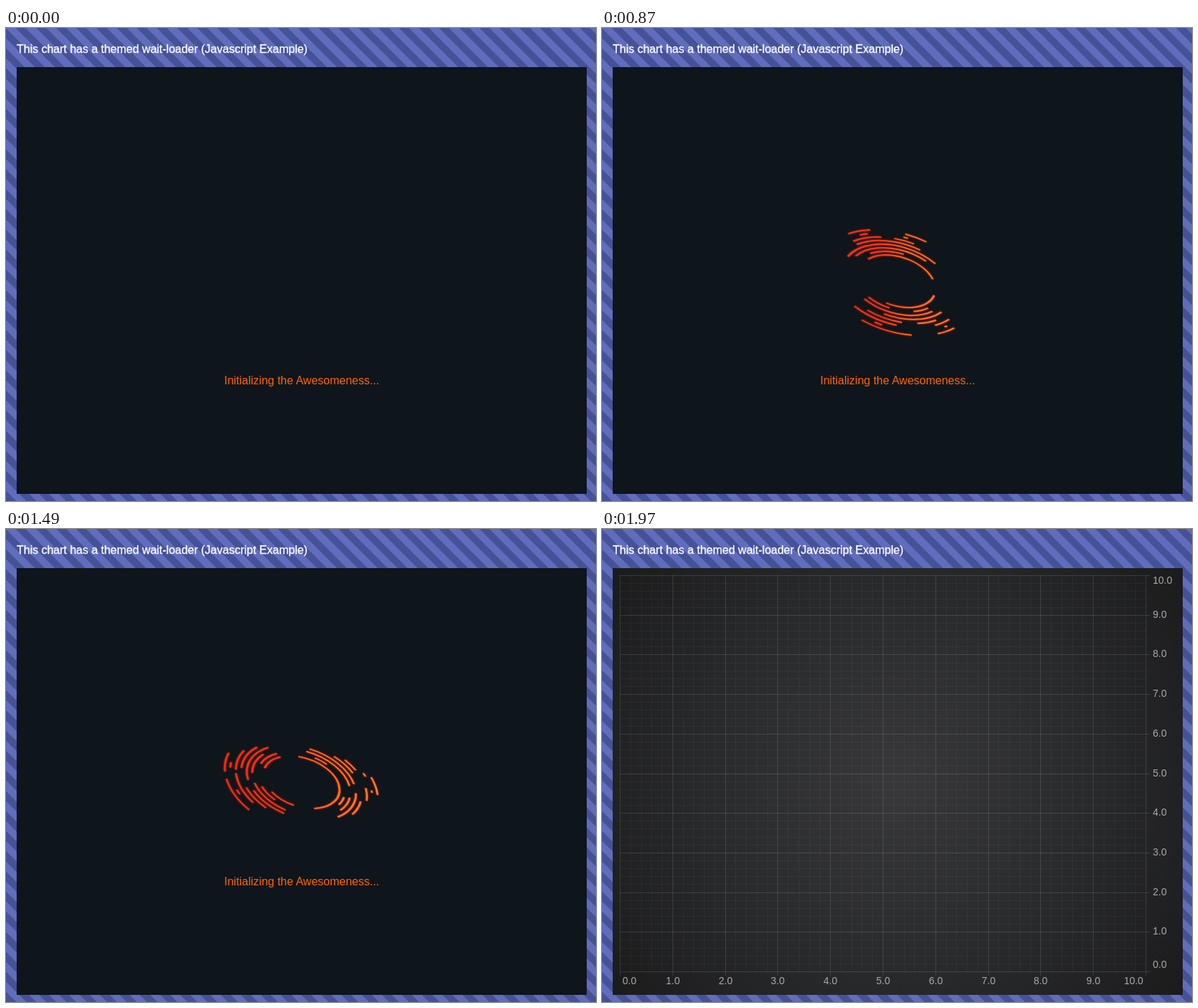
Write an HTML page that moves like this. It is 828 px wide and 665 px high and loops after 2.76 s.

```html
<!DOCTYPE html>
<html lang="en">
<head>
<meta charset="utf-8">
<title>Themed wait-loader</title>
<style>
  html, body { margin: 0; width: 100%; height: 100%; overflow: hidden; }
  body { background: repeating-linear-gradient(45deg, #465298 0 10px, #606dbc 10px 20px); }
  svg { display: block; font: 16px "Liberation Sans", Arial, sans-serif; }
  #labels { font-size: 14px; fill: #aaa; }
  #glow { filter: drop-shadow(0 0 1.5px #c0200a); }
</style>
</head>
<body>
<svg width="828" height="665">
  <defs>
    <linearGradient id="ember" gradientUnits="userSpaceOnUse" x1="-108" x2="108">
      <stop offset="0" stop-color="#f02a12"/>
      <stop offset=".4" stop-color="#f83a1a"/>
      <stop offset=".55" stop-color="#ff6a1c"/>
      <stop offset="1" stop-color="#ff7a22"/>
    </linearGradient>
    <radialGradient id="vignette" gradientUnits="userSpaceOnUse" cx="415" cy="355" r="500">
      <stop offset="0" stop-color="#38383a"/>
      <stop offset=".5" stop-color="#2a2b2d"/>
      <stop offset="1" stop-color="#1b1b1c"/>
    </radialGradient>
  </defs>
  <text x="15" y="35" fill="#fff" stroke="#fff" stroke-width=".3">This chart has a themed wait-loader (Javascript Example)</text>
  <g id="loader">
    <rect x="15" y="55" width="800" height="600" fill="#0e151b"/>
    <text x="415" y="501" fill="#f60" text-anchor="middle">Initializing the Awesomeness...</text>
    <g id="glow" fill="none" stroke="url(#ember)" stroke-width="2.9"></g>
  </g>
  <g id="chart">
    <rect x="15" y="55" width="800" height="600" fill="url(#vignette)"/>
    <path id="minor" stroke="#fff" stroke-opacity=".04"/>
    <path id="major" stroke="#fff" stroke-opacity=".12"/>
    <g id="labels"></g>
  </g>
</svg>
<script>
const $ = id => document.getElementById(id);
const NS = 'http://www.w3.org/2000/svg';
const LOOP = 2760, STEP = 68, SHOW_AT = 60, CHART_AT = 1970;
const MERGE_AT = 330, MERGE_PERIOD = 1070, SWAY_PERIOD = 690;

function add(parent, tag, attrs, text = '') {
  const el = document.createElementNS(NS, tag);
  for (const key in attrs) el.setAttribute(key, attrs[key]);
  el.textContent = text;
  parent.append(el);
  return el;
}

// Repeatable noise from -1 to 1
function noise(n) {
  const x = Math.sin(n * 12.9898) * 43758.5453;
  return 2 * (x - Math.floor(x)) - 1;
}

const mix = (a, b, p) => a + (b - a) * p;

// Chart grid and axis labels
function buildChart() {
  const left = 25, right = 763, top = 65, bottom = 622;
  let minor = '', major = '';
  for (let i = 0; i <= 50; i++) {
    const isMajor = i % 5 === 0, tick = isMajor ? 6 : 0;
    const x = Math.round(mix(left, right, i / 50)) + .5;
    const y = Math.round(mix(bottom, top, i / 50)) + .5;
    const lines = `M${x} ${top}V${bottom + tick}M${left} ${y}H${right + tick}`;
    if (!isMajor) { minor += lines; continue; }
    major += lines;
    const value = (i / 5).toFixed(1);
    const labelX = Math.min(746, Math.max(38.5, x));
    const labelY = Math.min(617, Math.max(77, y + 3.5));
    add($('labels'), 'text', { x: labelX, y: 640, 'text-anchor': 'middle' }, value);
    add($('labels'), 'text', { x: 773, y: labelY }, value);
  }
  $('minor').setAttribute('d', minor);
  $('major').setAttribute('d', major);
}

// Rings are circles on a tilted plane, given by the mean arc length in degrees
const rings = [61, 27, 50, 55, 26, 26, 5, 20].map((span, k) => ({
  k, span,
  radius: 53.5 + 7.7 * k,
  path: add($('glow'), 'path', { transform: `matrix(1 .205 0 .66 414.5 ${356 + .28 * k})` })
}));

function arcPath(r, centre, span) {
  const point = deg => {
    const t = deg * Math.PI / 180;
    return `${(r * Math.cos(t)).toFixed(2)} ${(r * Math.sin(t)).toFixed(2)}`;
  };
  return `M${point(centre - span / 2)}A${r} ${r} 0 0 1 ${point(centre + span / 2)}`;
}

// A pair of arcs on each side parts from its centre and merges again
function drawRing({ k, span, radius, path }, t) {
  const open = Math.abs(Math.sin(Math.PI * (t - MERGE_AT) / MERGE_PERIOD));
  const split = mix(42 - 5 * k, 70, open);
  let d = '';
  for (let j = 0; j < 4; j++) {
    const onLeft = j < 2, dir = j % 2 ? 1 : -1, seed = 4 * k + j + 1;
    const wave = Math.sin(2 * Math.PI * t / SWAY_PERIOD + 3 * noise(seed));
    const centre = (onLeft ? 172 : 350) + dir * split + 10 * noise(seed + 50) + 8 * wave;
    const share = 1 + (onLeft ? 1 : -1) * (.08 * k - .2);
    const breath = 1 + .3 * noise(seed + 90) + .2 * wave;
    d += arcPath(radius, centre, span * share * breath);
  }
  path.setAttribute('d', d);
}

const show = (id, on) => $(id).style.display = on ? '' : 'none';

function frame() {
  const now = performance.now() % LOOP;
  const t = Math.floor(now / STEP) * STEP;
  show('chart', now >= CHART_AT);
  show('loader', now < CHART_AT);
  show('glow', now >= SHOW_AT);
  for (const ring of rings) drawRing(ring, t);
  requestAnimationFrame(frame);
}

buildChart();
frame();
</script>
</body>
</html>
```
